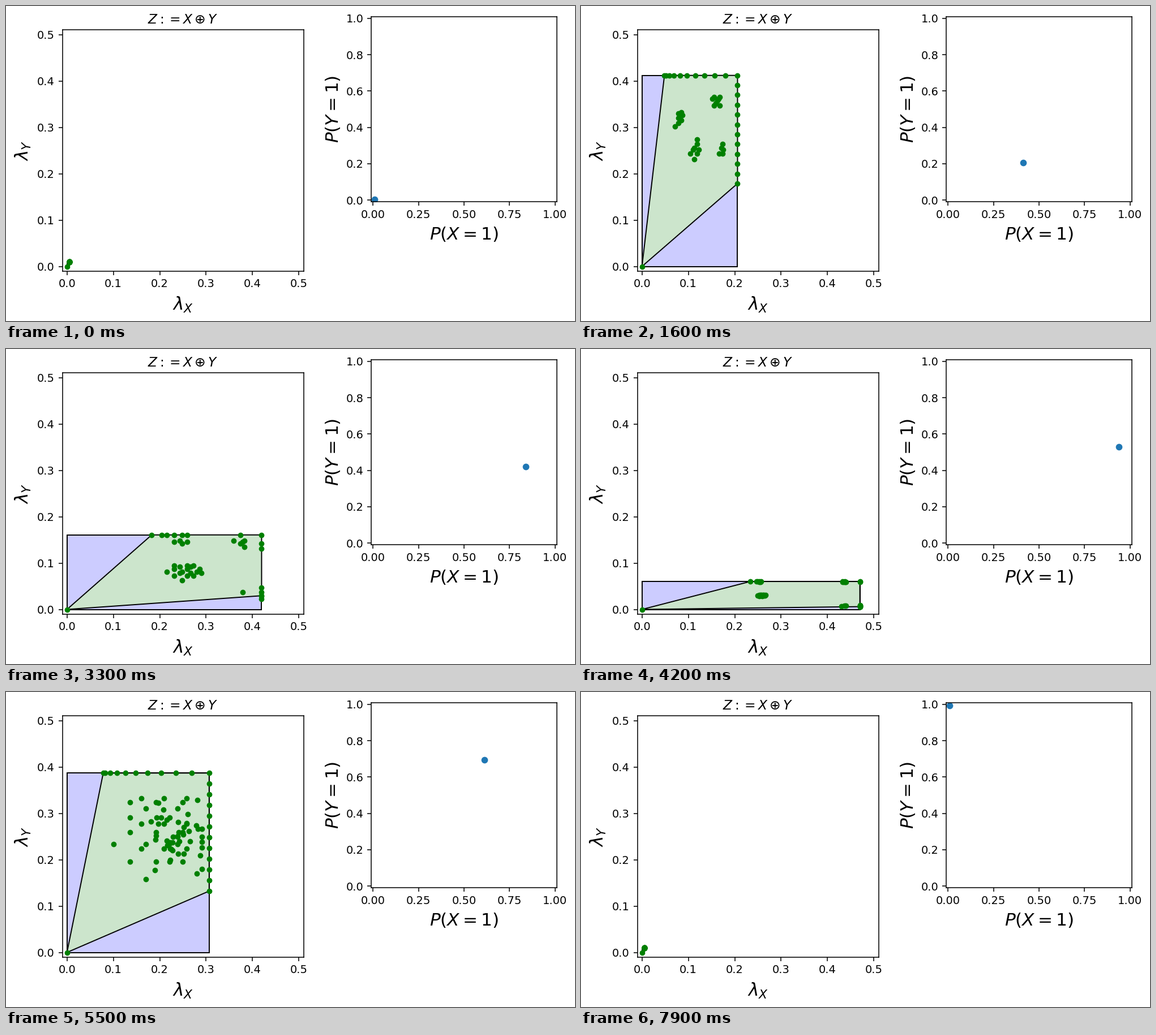
A matplotlib script for the animation above (8000 ms loop, 1005x557 px).

```python
import numpy as np
import matplotlib.pyplot as plt
from matplotlib.animation import FuncAnimation
from matplotlib.patches import Polygon, Rectangle

W, H, DPI = 1005, 557, 140
N = 80
HALF = N // 2

# Lower ends of the green edges, as shares of the box, at key steps
KEYS = [0, 4, 16, 24, 26, 37, 39]
LOW_X = [0.95, 0.5, 0.235, 0.255, 0.328, 0.497, 0.5]
LOW_Y = [0.95, 0.6, 0.434, 0.342, 0.331, 0.1, 0.03]

# Places where the dots gather early and late in the sweep
EARLY = np.array([(0.36, 0.77), (0.55, 0.6), (0.86, 0.6), (0.8, 0.89)])
LATE = np.array([(0.53, 0.5), (0.53, 1), (0.94, 1), (1, 1), (0.94, 0.1), (1, 0.1)])


def lattice():
    """Inner dots at fractions with the denominators 5 to 8."""
    dots = [(i / 5, j / 5) for i in (2, 3, 4) for j in (2, 3, 4)
            if abs(i - j) <= 1 and i + j > 4]
    for d in (6, 7):
        dots += [(i / d, j / d) for i in range(d - 3, d) for j in range(d - 3, d)]
    dots += [(0.5, 0.75), (0.67, 0.75), (0.75, 0.75), (0.75, 0.5)]
    return np.array(dots)


GRID = lattice()
EDGE = np.array([1 / 3, 2 / 5, 1 / 2, 3 / 5, 2 / 3, 4 / 5])
rng = np.random.default_rng(4)
CLOUD = np.clip(rng.normal((0.82, 0.63), (0.12, 0.09), (42, 2)), 0.4, 0.95)


def stretch(share, low):
    """Map the range from 1/3 to 1 onto the range from low to 1."""
    return 1 - (1 - share) * (1 - low) * 1.5


def pull(dots, places, strength):
    """Move each dot towards the nearest gathering place."""
    gap = np.linalg.norm(dots[:, None] - places[None], axis=2)
    return dots + strength * (places[gap.argmin(axis=1)] - dots)


def on_edges(top, right):
    return np.r_[np.c_[top, np.ones(len(top))], np.c_[np.ones(len(right)), right]]


def shares(k, a, b):
    """Dots as shares of the box sides."""
    inner = np.c_[stretch(GRID[:, 0], a), stretch(GRID[:, 1], b)]
    if k < 26:
        top = a + (1 - a) * (np.arange(1, 10) / 10) ** 1.7
        right = b + (1 - b) * np.arange(1, 11) / 11
        edges = on_edges(top, right)
        if k < HALF / 2:
            inner = pull(inner, EARLY, 0.65 * min(1, k / 12))
            if k < 4:
                inner = edges
        else:
            inner = np.r_[inner, CLOUD]
    else:
        strength = 0.9 * np.clip((k - 27) / 10, 0, 1)
        edges = pull(on_edges(stretch(EDGE, a), stretch(EDGE, b)), LATE, strength)
        inner = pull(inner, LATE, strength)
    ends = [(0, 0), (a, 1), (1, 1), (1, b)]
    return np.r_[ends, edges, inner]


def add_axes(left, top, width, height, hi, xlabel, ylabel, pad):
    ax = fig.add_axes([left / W, 1 - (top + height) / H, width / W, height / H])
    ax.set(xlim=(-0.01, hi), ylim=(-0.01, hi))
    ax.set_xlabel(xlabel, fontsize=16, labelpad=pad)
    ax.set_ylabel(ylabel, fontsize=16)
    return ax


fig = plt.figure(figsize=(W / DPI, H / DPI), dpi=DPI, facecolor="white")

ax = add_axes(99.5, 42.4, 426, 426.3, 0.51, r"$\lambda_X$", r"$\lambda_Y$", 5.3)
ax.set_title(r"$Z := X \oplus Y$")
ax.set_xticks(np.arange(6) / 10)
ax.set_yticks(np.arange(6) / 10)

side = add_axes(645, 18.7, 328, 327.7, 1.01, "$P(X=1)$", "$P(Y=1)$", 4.8)
side.set_xticks(np.arange(5) / 4)
side.set_yticks(np.arange(6) / 5)

outer = ax.add_patch(Rectangle((0, 0), 0, 0, fc="#ccccff", ec="black", lw=1))
green = ax.add_patch(Polygon([(0, 0)] * 4, fc="#cce5cc", ec="black", lw=1))
dots, = ax.plot([], [], "o", color="green", ms=4)
point, = side.plot([], [], "o", color="C0", ms=5)


def update(i):
    # P(X=1) rises and falls while P(Y=1) keeps rising
    k = min(i, N - 1 - i)
    x = 0.01 + 0.98 * k / (HALF - 1)
    y = x / 2 if i < HALF else 1 - x / 2
    point.set_data([x], [y])

    w, h = min(y, 1 - y), min(x, 1 - x)
    a, b = np.interp(k, KEYS, LOW_X), np.interp(k, KEYS, LOW_Y)
    outer.set_width(w)
    outer.set_height(h)
    green.set_xy([(0, 0), (a * w, h), (w, h), (w, b * h)])
    dots.set_data(*(shares(k, a, b) * (w, h)).T)
    return outer, green, dots, point


anim = FuncAnimation(fig, update, frames=N, interval=100, repeat=True)
plt.show()
```
